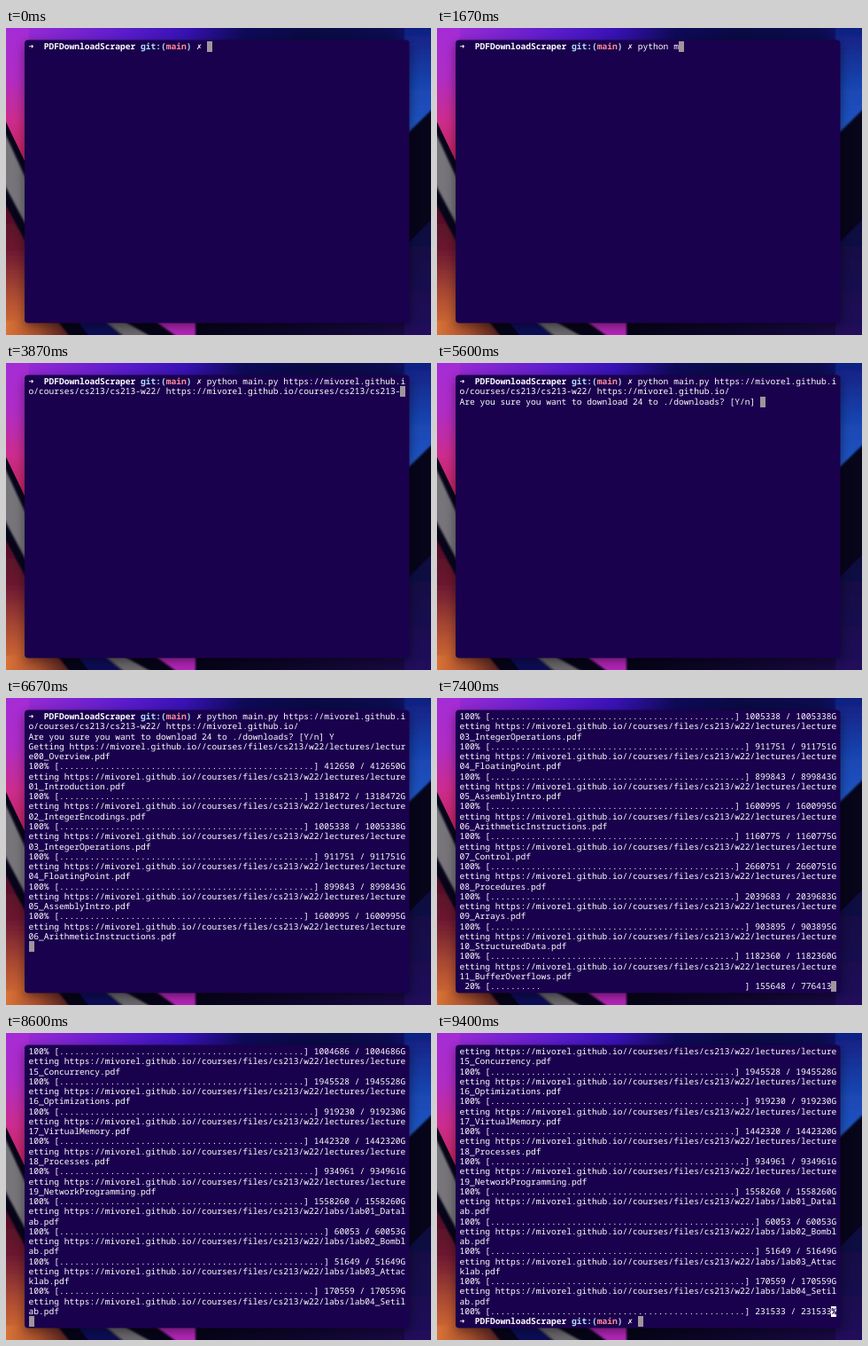
Recreate the animation shown at these times as an HTML page with a canvas. Size 480 px wide and 346 px high, loop 9470 ms.

```html
<!DOCTYPE html>
<html lang="en">
<head>
<meta charset="utf-8">
<title>Terminal session</title>
<style>
  html, body { margin: 0; width: 100%; height: 100%; overflow: hidden; background: #07051a; }
  svg, canvas { position: absolute; left: 0; top: 0; width: 480px; height: 346px; }
</style>
</head>
<body>
<svg viewBox="0 0 480 346">
  <defs>
    <linearGradient id="top">
      <stop offset="0" stop-color="#a42cd6"/>
      <stop offset=".12" stop-color="#8426d2"/>
      <stop offset=".28" stop-color="#5a1ccc"/>
      <stop offset=".42" stop-color="#3812b4"/>
      <stop offset=".56" stop-color="#0e0a58"/>
      <stop offset=".72" stop-color="#0a0a44"/>
      <stop offset=".9" stop-color="#0c0c50"/>
      <stop offset="1" stop-color="#101c7c"/>
    </linearGradient>
    <linearGradient id="left" x2="0" y2="1">
      <stop offset="0" stop-color="#a42cd6"/>
      <stop offset=".35" stop-color="#b02cc4"/>
      <stop offset=".65" stop-color="#cc2c8c"/>
      <stop offset="1" stop-color="#c02050"/>
    </linearGradient>
    <linearGradient id="glow" x2="0" y2="1">
      <stop offset="0" stop-color="#4c0c24"/>
      <stop offset=".35" stop-color="#6c1830"/>
      <stop offset=".7" stop-color="#b04e30"/>
      <stop offset="1" stop-color="#dc7436"/>
    </linearGradient>
    <linearGradient id="floor">
      <stop offset="0" stop-color="#dc7436"/>
      <stop offset=".5" stop-color="#a8502e"/>
      <stop offset="1" stop-color="#4a1a20"/>
    </linearGradient>
    <linearGradient id="right" x2="0" y2="1">
      <stop offset="0" stop-color="#101c7c"/>
      <stop offset=".6" stop-color="#1a48b4"/>
      <stop offset="1" stop-color="#2258c4"/>
    </linearGradient>
    <linearGradient id="corner" x2="0" y2="1">
      <stop offset="0" stop-color="#0c0a3c"/>
      <stop offset="1" stop-color="#220a5c"/>
    </linearGradient>
    <linearGradient id="base">
      <stop offset=".45" stop-color="#060418"/>
      <stop offset="1" stop-color="#1c0a4c"/>
    </linearGradient>
    <filter id="soft"><feGaussianBlur stdDeviation=".8"/></filter>
    <filter id="shadow" x="-20%" y="-20%" width="140%" height="140%">
      <feGaussianBlur stdDeviation="6"/>
    </filter>
  </defs>
  <rect width="480" height="346" fill="#07051a"/>
  <rect y="325" width="480" height="21" fill="url(#base)"/>
  <rect width="480" height="40" fill="url(#top)"/>
  <path d="M0 0H26V160L0 106Z" fill="url(#left)"/>
  <g filter="url(#soft)">
    <path d="M-2 117L30 186V236L-2 176Z" fill="#777579"/>
    <path d="M-2 196L30 256V350H-2Z" fill="url(#glow)"/>
    <path d="M-2 330H58L74 350H-2Z" fill="url(#floor)"/>
    <path d="M80 330H112L134 350H96Z" fill="#0e0a58"/>
    <path d="M112 330H132L168 350H136Z" fill="#6a686c"/>
    <path d="M168 330H214V350H196Z" fill="#b428b8"/>
    <path d="M450 -5H486V87L450 122Z" fill="url(#right)"/>
    <path d="M450 246L486 210V350H450Z" fill="url(#corner)"/>
  </g>
  <rect x="21" y="17" width="435" height="319" rx="5" opacity=".45" filter="url(#shadow)"/>
  <rect x="21" y="13.5" width="434.5" height="319" rx="4" fill="#1a014d"/>
</svg>
<canvas width="480" height="346"></canvas>
<script>
const ctx = document.querySelector('canvas').getContext('2d');
const LOOP = 9470, FPS = 15;
const COLS = 74, ROWS = 28, CELL = 5.753, LINE = 11.27, LEFT = 25.5, TOP = 15.2;
const FONT = '9.588px "Noto Sans Mono", "DejaVu Sans Mono", monospace';

const PLAIN = { color: '#fff' };
const BOLD = { color: '#fff', bold: true };
const BLUE = { color: '#b4defc', bold: true };
const RED = { color: '#ff8c98', bold: true };
const INVERSE = { color: '#1a014d', bold: true, back: '#fff' };

const SITE = 'https://mivorel.github.io/';
const PAGE = SITE + 'courses/cs213/cs213-w22/';
const FILES = SITE + '/courses/files/cs213/w22/';
const lectures = [
  ['Overview', 412650], ['Introduction', 1318472], ['IntegerEncodings', 1005338],
  ['IntegerOperations', 911751], ['FloatingPoint', 899843], ['AssemblyIntro', 1600995],
  ['ArithmeticInstructions', 1160775], ['Control', 2660751], ['Procedures', 2039683],
  ['Arrays', 903895], ['StructuredData', 1182360], ['BufferOverflows', 776413],
  ['MemoryHierarchy', 1190626], ['CacheMemories', 613778], ['CachePerformance', 1004686],
  ['Concurrency', 1945528], ['Optimizations', 919230], ['VirtualMemory', 1442320],
  ['Processes', 934961], ['NetworkProgramming', 1558260],
];
const labs = [['Datalab', 60053], ['Bomblab', 51649], ['Attacklab', 170559], ['Setilab', 231533]];
const two = n => String(n).padStart(2, '0');
const downloads = [
  ...lectures.map(([name, size], i) => [`lectures/lecture${two(i)}_${name}`, size]),
  ...labs.map(([name, size], i) => [`labs/lab${two(i + 1)}_${name}`, size]),
];

// Download timing: a fixed wait per request, then a steady transfer.
const START = 5981.73, WAIT = 58.788, BYTES_PER_MS = 20000, BLOCK = 8192;

let rows;
function put(text, style = PLAIN) {
  for (const char of text) {
    if (char === '\n') { rows.push([]); continue; }
    if (rows.at(-1).length === COLS) rows.push([]);
    rows.at(-1).push({ char, style });
  }
}

function prompt() {
  put('➜  PDFDownloadScraper ', BOLD);
  put('git:(', BLUE);
  put('main', RED);
  put(')', BLUE);
  put(' ✗ ', BOLD);
}

function command(t) {
  const typed = 'python main.py '.slice(0, Math.max(0, Math.floor((t - 900) / 95)));
  const erased = Math.min(24, Math.max(0, Math.floor((t - 3730) / 33)));
  let text = typed;
  if (t >= 2700) text += PAGE;
  if (t >= 3000) text += ' ';
  if (t >= 3250) text += PAGE.slice(0, PAGE.length - erased);
  return text;
}

function bar(bytes, size) {
  const done = bytes >= size ? size : Math.floor(bytes / BLOCK) * BLOCK;
  const total = String(size), width = 62 - 2 * total.length;
  const percent = String(Math.floor(100 * done / size)).padStart(3);
  const dots = '.'.repeat(Math.floor(width * done / size)).padEnd(width);
  return `${percent}% [${dots}] ${String(done).padStart(total.length)} / ${total}`;
}

function session(t) {
  rows = [[]];
  prompt();
  put(command(t));
  if (t >= 4800) put('\n');
  if (t >= 5300) put(`Are you sure you want to download ${downloads.length} to ./downloads? [Y/n] `);
  if (t >= 5750) put('Y');
  if (t >= 5900) put('\n');
  let start = START;
  for (const [name, size] of downloads) {
    if (t < start) return;
    put(`Getting ${FILES}${name}.pdf\n`);
    const bytes = (t - start - WAIT) * BYTES_PER_MS;
    if (bytes >= 0) put(bar(bytes, size));
    start += WAIT + size / BYTES_PER_MS;
  }
  if (t >= start + 150) {
    put('%', INVERSE);
    put('\n');
    prompt();
  }
}

function block(col, row, color) {
  ctx.fillStyle = color;
  ctx.fillRect(Math.round(LEFT + col * CELL), Math.round(TOP + row * LINE), 6, 12);
}

function draw(t) {
  session(t);
  if (rows.at(-1).length === COLS) rows.push([]);
  const visible = rows.slice(-ROWS);
  ctx.clearRect(0, 0, 480, 346);
  ctx.textRendering = 'geometricPrecision';
  visible.forEach((cells, row) => cells.forEach(({ char, style }, col) => {
    if (char === ' ') return;
    if (style.back) block(col, row, style.back);
    ctx.font = (style.bold ? 'bold ' : '') + FONT;
    ctx.fillStyle = style.color;
    ctx.fillText(char, LEFT + col * CELL, TOP + 8.8 + row * LINE);
  }));
  block(visible.at(-1).length, visible.length - 1, '#a0959c');
}

let shown = -1;
function tick() {
  const step = Math.floor((performance.now() % LOOP) * FPS / 1000 + 0.07);
  if (step !== shown) draw(step * 1000 / FPS);
  shown = step;
  requestAnimationFrame(tick);
}
tick();
</script>
</body>
</html>
```
